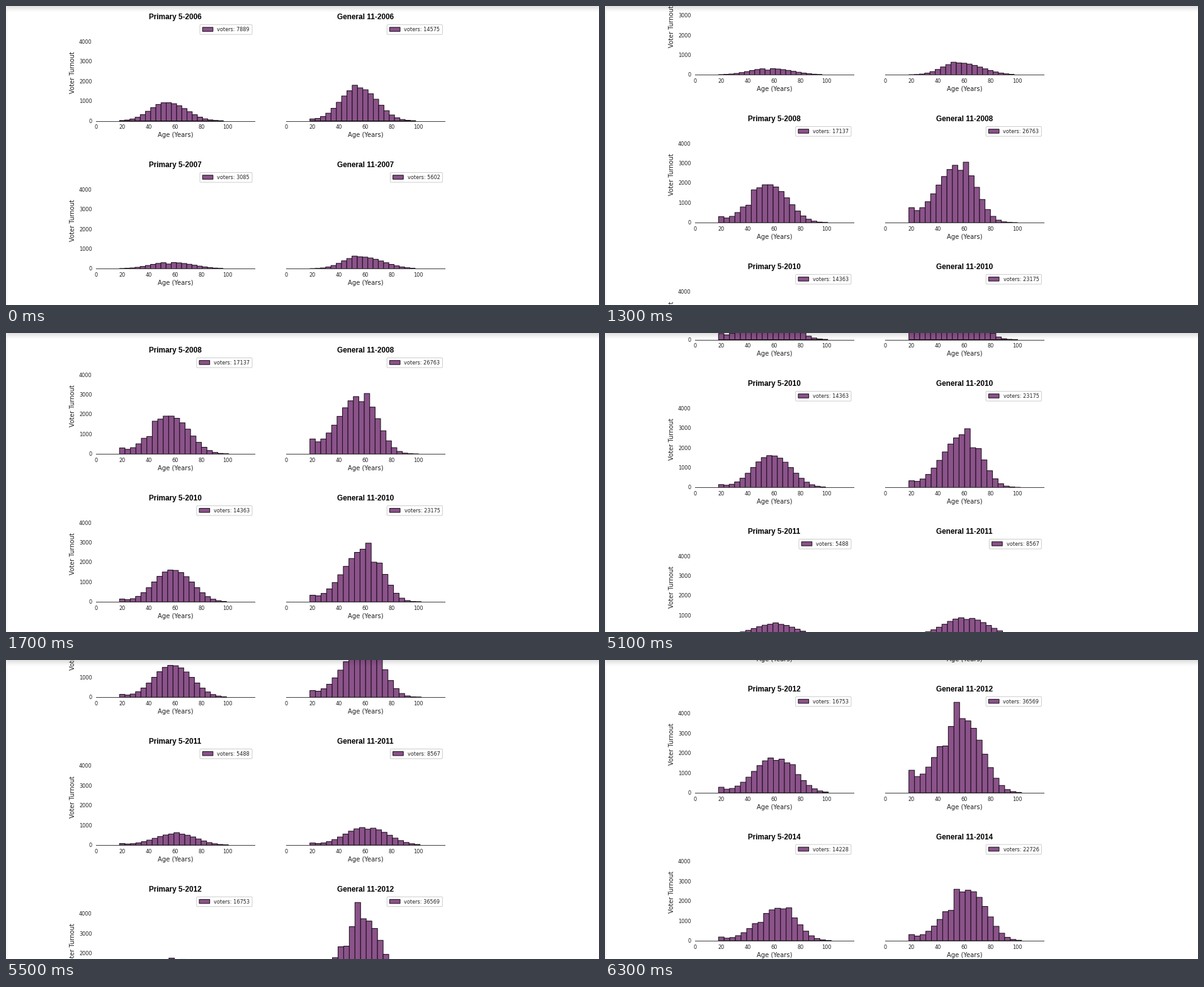
Animation, 942 px wide and 475 px high, one loop 8000 ms. Source, as a matplotlib script:

```python
import numpy as np
import matplotlib.pyplot as plt
from matplotlib.animation import FuncAnimation
from matplotlib.collections import PolyCollection
from matplotlib.patches import FancyBboxPatch, Rectangle

W, H, DPI = 942, 475, 100
INTERVAL, LOOP = 100, 8000
ROW_PITCH = 234.9
BASELINE = 182.5
PX_PER_YEAR = 2.096
PX_PER_VOTER = 0.0314
YOUNGEST, BINS = 18, 20
PURPLE, EDGE, INK = "#8b538a", "#1c0f1c", "#222222"

# Scroll position of the page from each moment (ms) on.
SCROLL = {0: 0, 500: 80, 900: 190, 1300: 308, 1700: 460,
          4700: 540.4, 5100: 641.8, 5500: 828, 5900: 1014.3, 6300: 1146}

fig = plt.figure(figsize=(W / DPI, H / DPI), dpi=DPI, facecolor="white")


def pixel_axes(zorder):
    ax = fig.add_axes([0, 0, 1, 1], zorder=zorder)
    ax.set_xlim(0, W)
    ax.set_ylim(H, 0)
    ax.axis("off")
    return ax


page = pixel_axes(1)
rows = {}


def write(x, y, text, size, **style):
    style = {"family": "DejaVu Sans", "color": INK, "ha": "center",
             "va": "baseline", **style}
    return page.text(x, y, text, fontsize=size * 72 / DPI, **style)


def legend(right, top, voters):
    left = right - 83 - 5.2 * (len(str(voters)) - 4)
    box = FancyBboxPatch((left + 2, top + 2), right - left - 4, 11.5,
                         boxstyle="round,pad=2,rounding_size=1.6",
                         fc="white", ec="#cccccc", lw=0.7)
    swatch = Rectangle((left + 4.2, top + 4.2), 16.6, 6.4,
                       fc=PURPLE, ec=EDGE, lw=0.75, snap=False)
    page.add_patch(box)
    page.add_patch(swatch)
    label = write(right - 4, top + 10.8, f"voters: {voters}", 8.2, ha="right")
    return [box, swatch, label]


def age_counts(voters, peak, rise, fall, young, bumps):
    """Voters per bin: a lopsided bell, a crowd of first-time voters, odd bins."""
    bins = np.arange(BINS)
    distance = np.abs(bins - peak)
    shape = np.where(bins < peak,
                     np.exp(-0.5 * (distance / rise) ** 2),
                     np.exp(-0.5 * (distance / fall) ** 2.3))
    shape += young * 0.35 ** bins
    for index, factor in bumps.items():
        shape[index] *= factor
    return voters * shape / shape.sum()


def chart(row, title, voters, oldest, peak, rise, fall, young=0.0, bumps={}):
    primary = title.startswith("Primary")
    x0 = 142.6 if primary else 445.0
    top = row * ROW_PITCH
    base = top + BASELINE
    mid = x0 + 126.2

    counts = age_counts(voters, peak, rise, fall, young, bumps)
    edges = x0 + np.linspace(YOUNGEST, oldest, BINS + 1) * PX_PER_YEAR
    tops = base - counts * PX_PER_VOTER
    bars = PolyCollection(
        [[(left, base), (left, y), (right, y), (right, base)]
         for left, right, y in zip(edges, edges[1:], tops)],
        facecolors=PURPLE, edgecolors=EDGE, linewidths=0.75, snap=False)
    page.add_collection(bars, autolim=False)
    axis, = page.plot([x0, x0 + 252.3], [base, base], color="#444444", lw=0.75,
                      scalex=False, scaley=False)

    artists = [bars, axis]
    artists.append(write(mid - 0.2, top + 21.3, title, 11.7, weight="bold",
                         family="Liberation Sans", color="black"))
    artists += legend(x0 + 248.4, top + 29.7, voters)
    for age in range(0, 101, 20):
        artists.append(write(x0 + age * PX_PER_YEAR, base + 12.8, age, 8.2))
    artists.append(write(mid, base + 25.8, "Age (Years)", 10))
    if primary:
        for count in range(0, 4001, 1000):
            y = base - count * PX_PER_VOTER
            artists.append(write(136.6, y + 3, count, 8.2, ha="right"))
        artists.append(write(105.8, top + 105.5, "Voter Turnout", 10,
                             rotation=90, va="center"))
    rows.setdefault(row, []).extend(artists)


chart(0, "Primary 5-2006", 7889, 96.7, peak=8.4, rise=3.0, fall=4.0)
chart(0, "General 11-2006", 14575, 98.2, peak=8.4, rise=3.15, fall=3.85,
      young=0.03, bumps={8: 1.08})
chart(1, "Primary 5-2007", 3085, 96.4, peak=9, rise=3.5, fall=4.7,
      bumps={9: 0.75})
chart(1, "General 11-2007", 5602, 97.8, peak=8.6, rise=2.85, fall=4.7,
      bumps={8: 1.08})
chart(2, "Primary 5-2008", 17137, 100.8, peak=8.4, rise=3.3, fall=3.85,
      young=0.12, bumps={5: 0.78, 6: 1.12})
chart(2, "General 11-2008", 26763, 100.4, peak=8.7, rise=3.95, fall=3.3,
      young=0.17, bumps={9: 0.9, 10: 1.1})
chart(3, "Primary 5-2010", 14363, 99.1, peak=9.2, rise=3.3, fall=3.9,
      young=0.07)
chart(3, "General 11-2010", 23175, 102.5, peak=9.4, rise=3.8, fall=3.2,
      young=0.08, bumps={10: 1.12, 11: 0.83})
chart(4, "Primary 5-2011", 5488, 100.5, peak=9.8, rise=3.75, fall=3.85,
      young=0.11, bumps={10: 1.1})
chart(4, "General 11-2011", 8567, 101.5, peak=9.5, rise=3.6, fall=4.2,
      young=0.09, bumps={10: 0.9})
chart(5, "Primary 5-2012", 16753, 101.2, peak=9.6, rise=3.6, fall=3.9,
      young=0.13, bumps={10: 0.92, 13: 1.15})
chart(5, "General 11-2012", 36569, 103.4, peak=8.9, rise=4.0, fall=3.65,
      young=0.22, bumps={6: 0.82, 8: 1.25})
chart(6, "Primary 5-2014", 14228, 103.4, peak=10.2, rise=3.7, fall=3.25,
      young=0.09, bumps={7: 0.82, 12: 1.15})
chart(6, "General 11-2014", 22726, 103.4, peak=10, rise=3.8, fall=3.35,
      young=0.09, bumps={7: 0.82, 8: 1.17})

# Fixed frame of the window: soft shadow on top, faint edges.
window = pixel_axes(2)
shadow = np.zeros((10, 1, 4))
shadow[:, 0, 3] = 0.13 * (1 - np.arange(10) / 10) ** 1.3
window.imshow(shadow, extent=(0, W, 10, 0), aspect="auto")
window.set_xlim(0, W)
window.set_ylim(H, 0)
window.plot([0.5, 0.5], [0, H], color="#f0f0f0", lw=0.72)
window.plot([0, W], [H - 0.5, H - 0.5], color="#e9e9e9", lw=0.72)


def update(frame):
    now = frame * INTERVAL
    offset = SCROLL[max(start for start in SCROLL if start <= now)]
    page.set_ylim(offset + H, offset)
    for row, artists in rows.items():
        top = row * ROW_PITCH - offset
        for artist in artists:
            artist.set_visible(-ROW_PITCH < top < H)
    return []


anim = FuncAnimation(fig, update, frames=LOOP // INTERVAL, interval=INTERVAL,
                     init_func=lambda: update(0), repeat=True, repeat_delay=0)
plt.show()
```
